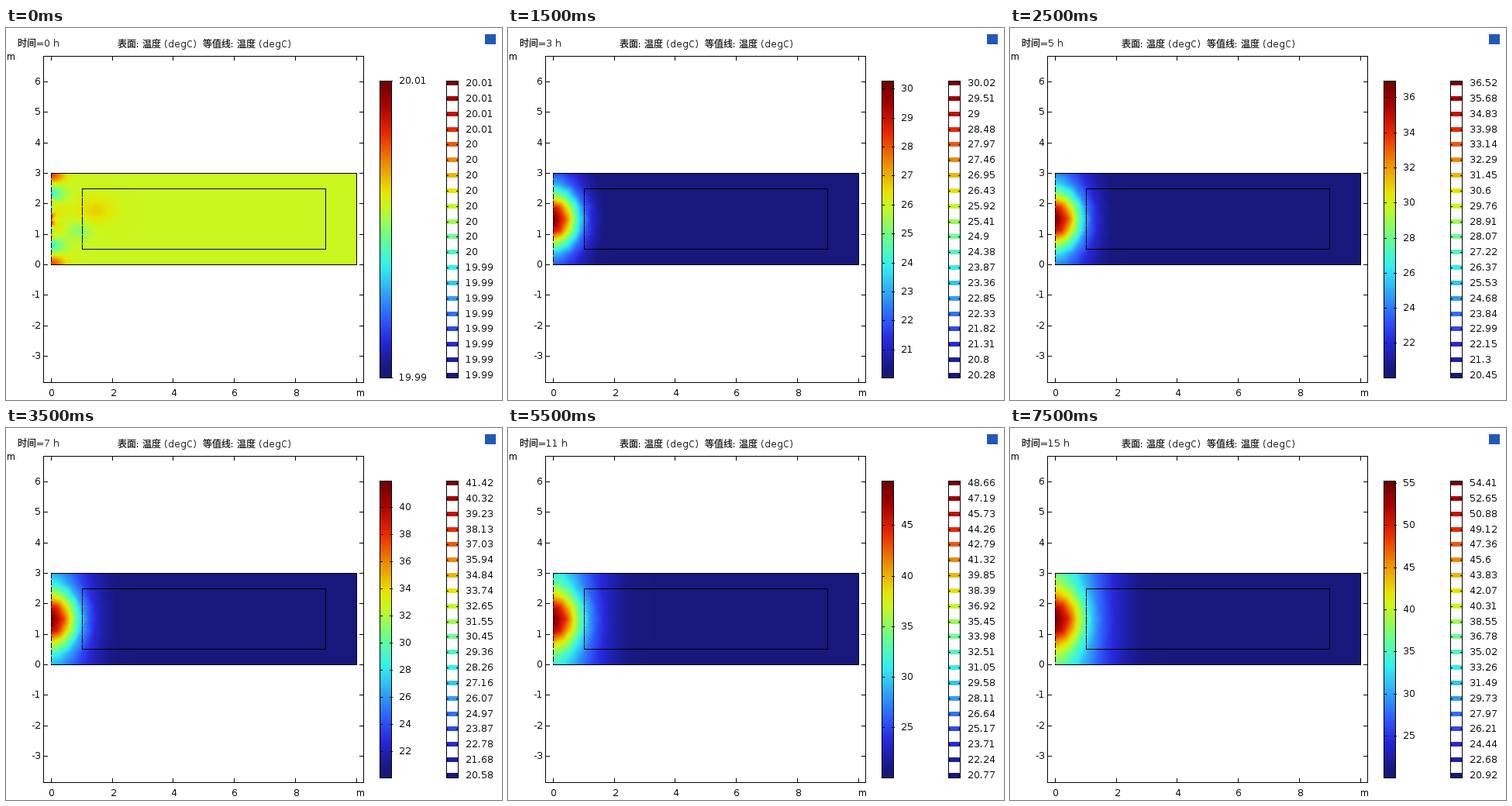
Animation, 640 px wide and 480 px high, one loop 8000 ms. Source, as a matplotlib script:

```python
import numpy as np
import matplotlib.pyplot as plt
from matplotlib.animation import FuncAnimation
from matplotlib.collections import LineCollection
from matplotlib.colors import LinearSegmentedColormap
from matplotlib.patches import Rectangle
from matplotlib.tri import LinearTriInterpolator, Triangulation

plt.rcParams.update({
    "font.family": ["DejaVu Sans", "Noto Sans CJK JP"],
    "font.size": 12,
    "text.hinting": "no_autohint",
    "text.hinting_factor": 1,
    "axes.unicode_minus": False,
})

W, H, DPI = 640, 480, 72
HOURS = 16
LEVELS = 20

cmap = LinearSegmentedColormap.from_list("heat", [
    (0.0, "#18187c"), (0.03, "#18187f"), (0.125, "#2828da"),
    (0.2, "#2f5cfd"), (0.375, "#32f0f0"), (0.475, "#6cff8c"),
    (0.575, "#c8f820"), (0.625, "#e6e600"), (0.725, "#ee8a00"),
    (0.825, "#ea2800"), (0.925, "#a50000"), (1.0, "#6e0000")], 512)

# Domain origin and scale, in pixels
X0, Y0, UNIT = 58, 305, 39.36
BAR_TOP, BAR_BOTTOM = 68, 451

fig = plt.figure(figsize=(W / DPI, H / DPI), dpi=DPI, facecolor="white")
ax = fig.add_axes([0, 0, 1, 1])
ax.set_axis_off()


def label(x, y, s="", ha="left", color="black"):
    return ax.text(x, y + 4, s, ha=ha, va="baseline", color=color)


def line(xs, ys, **kw):
    ax.plot(xs, ys, color="black", lw=1, antialiased=False,
            solid_capstyle="projecting", **kw)


def box(x0, y0, x1, y1, **kw):
    style = dict(fill=False, ec="black", lw=1, antialiased=False) | kw
    ax.add_patch(Rectangle((x0, y0), x1 - x0, y1 - y0, **style))


def bump(x, y, cx, cy, sx, sy):
    return np.exp(-0.5 * ((x - cx) / sx) ** 2 - 0.5 * ((y - cy) / sy) ** 2)


# Temperature field on a coarse triangle mesh
gx, gy = np.meshgrid((np.arange(394) + 0.5) / UNIT,
                     (118.5 - np.arange(119)) / UNIT)


def make_mesh(dx=0.42, rows=9):
    pts = []
    for row in range(rows):
        xs = np.arange(0, 10, dx) + dx / 2 * (row % 2)
        xs = np.unique(np.r_[0, xs, 10.3])
        pts += [(x, 3.03 * row / (rows - 1)) for x in xs]
    return Triangulation(*np.array(pts).T)


mesh = make_mesh()
finder = mesh.get_trifinder()


def heat(x, y, hour):
    """Relative temperature: a widening plane front plus a warm spot."""
    wall = 0.14 * (hour / 3) ** 0.72
    depth = 1.1 * (hour / 3) ** 0.24
    width = 0.59 + 0.004 * (hour - 3)
    front = np.exp(-(x / depth) ** 1.6)
    return wall * front + (1 - wall) * bump(x, y, 0, 1.5, width, 0.635)


def ripples(x, y):
    """Start-up noise that fades away from the left wall."""
    s = np.abs(y - 1.5)
    broad = 0.12 * (0.3 + s) * np.cos(2 * np.pi * (s - 1.45) / 1.25)
    core = 0.4 * np.cos(2 * np.pi * (s - 0.1) / 0.5)
    return (0.578
            + broad * np.exp(-(x / 0.45) ** 2)
            + core * np.exp(-x / 0.05 - (s / 0.9) ** 4)
            + 0.07 * bump(x, y, 1.45, 1.8, 0.45, 0.3)
            - 0.07 * bump(x, y, 0.9, 1.15, 0.3, 0.2))


def field(hour):
    if hour == 0:
        return ripples(gx, gy)
    nodes = heat(mesh.x, mesh.y, hour)
    u = LinearTriInterpolator(mesh, nodes, trifinder=finder)(gx, gy)
    return np.ma.filled(u, 0)


# Rise of the top contour over 20 degrees at a few hours
KEY_HOURS = np.array([3, 5, 7, 9, 11, 15])
KEY_RISE = np.array([10.02, 16.521, 21.42, 25.352, 28.661, 34.41])


def levels(hour):
    """Lowest and highest contour level; growth follows the root of time."""
    if hour == 0:
        return 19.9863, 20.0091
    rate = np.interp(hour, [0, *KEY_HOURS], [1, *KEY_RISE / KEY_HOURS ** 0.5])
    high = 20 + rate * hour ** 0.5
    floor = 20.0394 - 0.0365 / hour
    return floor + (high - floor) / (2 * LEVELS - 1), high


surface = ax.imshow(np.zeros(gx.shape), cmap=cmap, vmin=0, vmax=1,
                    extent=(58, 452, 306, 187),
                    interpolation="nearest", aspect="auto")

# Domain outlines
for y in (187, 305):
    line([58, 452], [y, y])
line([452, 452], [187, 305])
line([58, 58], [187, 305], dashes=(6, 2))
for y in (207, 285):
    line([98, 412], [y, y])
line([98, 98], [207, 285], dashes=(10, 1))
line([412, 412], [207, 285])

# Plot frame
L, T, R, B = 48, 36, 461, 457
box(L, T, R, B)
for v in range(0, 11, 2):
    x = int(X0 + v * UNIT + 0.5)
    line([x, x], [B, B - 5])
    line([x, x], [T, T + 5])
    if v < 10:
        label(x + 1.5, 471, str(v), "center")
for v in range(-3, 7):
    y = int(Y0 - v * UNIT + 0.5)
    line([L, L + 5], [y, y])
    line([R - 5, R], [y, y])
    label(45, y, str(v), "right")
label(457.5, 471, "m", "center")
label(7, 37, "m", "center")

clock = label(15, 21, color="#202020")
label(143.5, 21, "表面: 温度 (degC)  等值线: 温度 (degC)", color="#202020")
box(618, 8, 632, 21, fill=True, fc="#2458b8", ec="none")

# Continuous scale
ax.imshow(np.linspace(1, 0, 384)[:, None], cmap=cmap, vmin=0, vmax=1,
          extent=(482, 498, BAR_BOTTOM + 1, BAR_TOP), aspect="auto")
box(482, BAR_TOP, 497, BAR_BOTTOM)
marks = LineCollection([], colors="black", linewidths=1, antialiaseds=False)
ax.add_collection(marks)
scale_text = [label(507, 0) for _ in range(14)]

# Contour scale
level_text = []
for i in range(LEVELS):
    y = 448 - 19.84 * i
    row = round(y)
    box(568, row - 3, 583, row + 3, fill=True,
        fc=cmap((i + 0.5) / LEVELS), ec="none")
    for x in (568, 581):
        line([x, x + 2], [row, row])
    level_text.append(label(593, y))
box(568, BAR_TOP, 583, BAR_BOTTOM)

ax.set_xlim(0, W)
ax.set_ylim(H, 0)


def number(v):
    return f"{round(v, 2):g}"


def scale_ticks(lo, hi):
    step = next(s for s in (0.1, 0.2, 0.5, 1, 2, 5, 10)
                if (hi - lo) / s <= 12)
    first = int(np.ceil(lo / step))
    last = int(np.floor(hi / step))
    return [k * step for k in range(first, last + 1)]


def update(hour):
    low, high = levels(hour)
    half = (high - low) / (LEVELS - 1) / 2
    lo, hi = low - half, high + half

    clock.set_text(f"时间={hour} h")
    surface.set_data(field(hour))
    for t, v in zip(level_text, np.linspace(low, high, LEVELS)):
        t.set_text(number(v))

    for t in scale_text:
        t.set_text("")
    segments = []
    ticks = scale_ticks(lo, hi) if hour else [lo, hi]
    for t, v in zip(scale_text, ticks):
        y = BAR_BOTTOM - (v - lo) / (hi - lo) * (BAR_BOTTOM - BAR_TOP)
        t.set_text(number(v))
        t.set_y(y + 4)
        row = round(y)
        segments += [[(482, row), (485, row)], [(495, row), (498, row)]]
    marks.set_segments(segments)
    return [clock, surface, marks, *level_text, *scale_text]


anim = FuncAnimation(fig, update, frames=HOURS, interval=500,
                     repeat=True, repeat_delay=0, blit=False)
plt.show()
```
